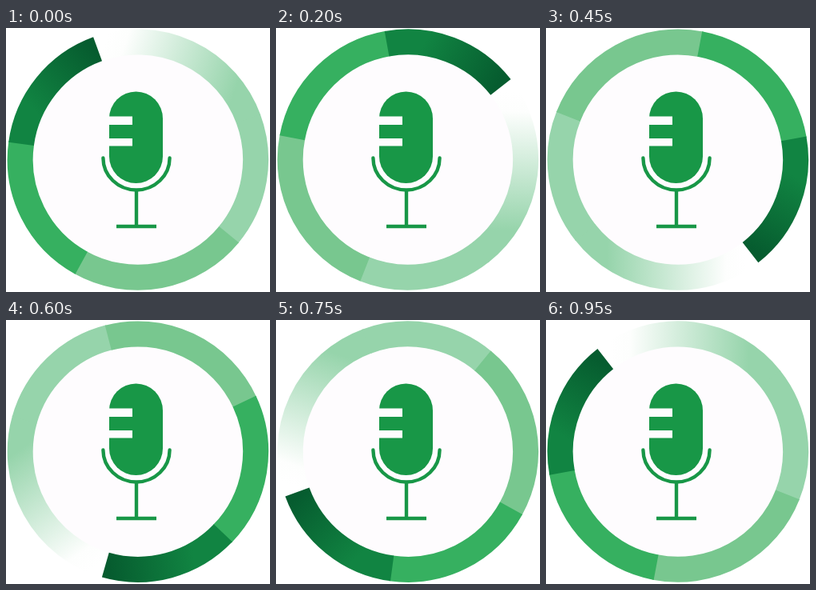
Animation of 330x330 px, one loop 1000 ms. Source, as an HTML page:

```html
<!DOCTYPE html>
<html lang="en">
<head>
<meta charset="utf-8">
<title>Microphone ring</title>
<style>
  html, body { margin: 0; width: 100%; height: 100%; overflow: hidden; background: #fff; }
  svg { display: block; width: 100vw; height: 100vh; }
</style>
</head>
<body>
<svg viewBox="0 0 330 330">
  <defs>
    <linearGradient id="fade" gradientUnits="userSpaceOnUse">
      <stop offset="0" stop-color="#fff"/>
      <stop offset=".14" stop-color="#fdfefd"/>
      <stop offset="1" stop-color="#96d4ab"/>
    </linearGradient>
    <linearGradient id="deep" gradientUnits="userSpaceOnUse">
      <stop offset="0" stop-color="#118442"/>
      <stop offset="1" stop-color="#065c2f"/>
    </linearGradient>
  </defs>
  <circle cx="164.9" cy="164.6" r="132" fill="#fefcfe"/>
  <g id="ring" fill="none" stroke-width="32"></g>
  <g fill="none" stroke="#189747" stroke-width="4.4">
    <rect x="129" y="79.5" width="67" height="114.5" rx="33.5" fill="#189747" stroke="none"/>
    <path d="M128 110.5h30v10.5h-30zM128 138h30v9.5h-30z" fill="#fefcfe" stroke="none"/>
    <path d="M121.4 162.5a41.6 40 0 0 0 83.2 0" stroke-linecap="round"/>
    <path d="M163 203V248M138 248H188"/>
  </g>
</svg>
<script>
const CX = 164.9, CY = 164.6, R = 147.2;
const START = -20, STEPS = 20, LOOP = 1000;
const ring = document.getElementById('ring');

// Clockwise from the top, in degrees.
function point(deg) {
  const a = deg * Math.PI / 180;
  return [R * Math.sin(a), -R * Math.cos(a)];
}

function arc(from, to, paint) {
  const p = document.createElementNS('http://www.w3.org/2000/svg', 'path');
  const big = to - from > 180 ? 1 : 0;
  p.setAttribute('d', `M${point(from)}A${R} ${R} 0 ${big} 1 ${point(to)}`);
  p.setAttribute('stroke', paint);
  ring.append(p);
}

function aim(id, from, to) {
  const g = document.getElementById(id);
  const [x1, y1] = point(from), [x2, y2] = point(to);
  Object.entries({ x1, y1, x2, y2 }).forEach(([k, v]) => g.setAttribute(k, v));
}

aim('fade', 3, 75);
aim('deep', 316, 358);
arc(0, 90, 'url(#fade)');
arc(89.5, 149.9, '#96d4ab');
arc(149.4, 229.2, '#78c78f');
arc(228.7, 298.2, '#36b060');
arc(297.7, 360, 'url(#deep)');

const t0 = performance.now();
function draw(now) {
  const t = Math.max(0, now - t0) % LOOP;
  const step = Math.floor(t / LOOP * STEPS);
  const turn = START + step * 360 / STEPS;
  ring.setAttribute('transform', `translate(${CX} ${CY}) rotate(${turn})`);
  requestAnimationFrame(draw);
}
draw(t0);
</script>
</body>
</html>
```
